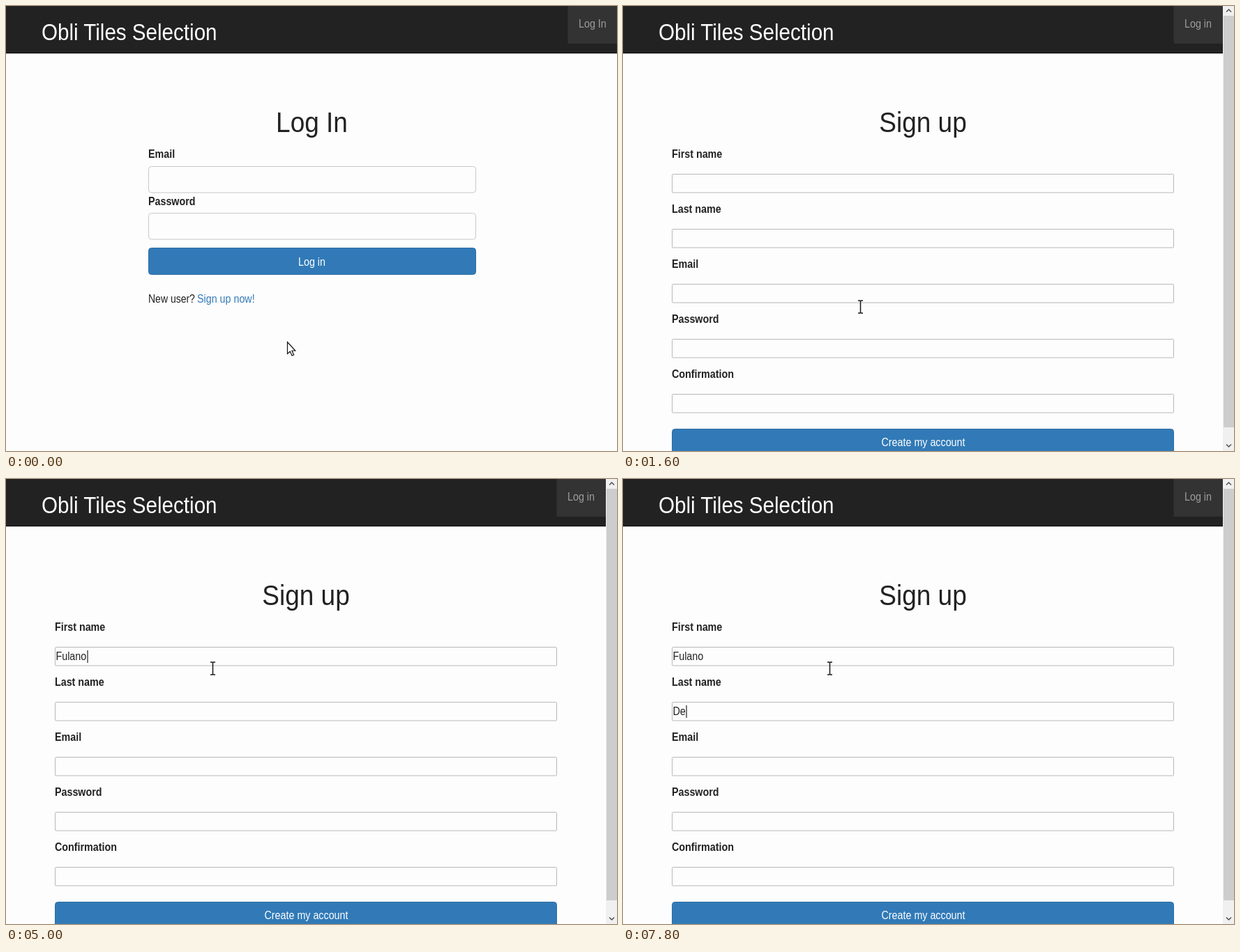
Write an HTML page that moves like this. It is 876x639 px and loops after 8 s.

```html
<!DOCTYPE html>
<html lang="en">
<head>
<meta charset="utf-8">
<title>Sign up demo</title>
<style>
  html, body { margin: 0; width: 100%; height: 100%; overflow: hidden; background: #fdfdfd; }
  svg { display: block; width: 876px; height: 639px; }
  text { font-family: "Liberation Sans", Arial, sans-serif; font-size: 14.3px; fill: #222; white-space: pre; }
  .mid { text-anchor: middle; }
  .logo { font-size: 29.6px; fill: #fff; }
  .title { font-size: 37px; }
  .label { font-weight: bold; }
  .nav { fill: #9d9d9d; }
  .light { fill: #fff; }
  .ask { font-size: 14px; }
  .link { fill: #337ab7; }
  .hover .link { fill: #23527c; }
  .status { font-family: "Open Sans", "Noto Sans", sans-serif; font-size: 11.1px; fill: #fff; }
</style>
</head>
<body>
<svg id="stage" viewBox="0 0 876 639">
  <rect width="876" height="639" fill="#fdfdfd"/>
  <g id="login"></g>
  <g id="signup"></g>
  <path id="caret" stroke="#222" stroke-width="1.2"/>
  <g id="arrow"><path d="M.5 .5V17.5L4.3 14L7 20L9.6 19L7 13H11.8Z" fill="#fff" stroke="#111" stroke-width="1.2"/></g>
  <g id="hand">
    <path d="M4.5 1.5Q6.5 -.3 8 2V8.5Q10 7.2 11 9.2Q13 8.2 13.9 10.2Q16.6 9.8 16.8 12.5V18Q16 21.5 14 23V26H6V23Q3 19 .6 14.5Q.2 12 2.6 12.6L4.5 15Z" fill="#fff" stroke="#222" stroke-width="1.2"/>
    <path d="M8 8.5V13M11 9.5V13M13.9 10.5V14" stroke="#222" fill="none"/>
  </g>
  <g id="beam"><path d="M-3.5 -9H-1L0 -8L1 -9H3.5M0 -8V8M-3.5 9H-1L0 8L1 9H3.5" fill="none" stroke="#181818" stroke-width="1.5"/></g>
</svg>
<script>
const el = id => document.getElementById(id);
const show = (node, on) => node.style.display = on ? "" : "none";

const text = (x, y, str, cls = "", id = "") =>
  `<text id="${id}" class="${cls}" transform="translate(${x} ${y}) scale(1 1.12)">${str}</text>`;
const box = (x, y, w, h, fill, extra = "") =>
  `<rect x="${x}" y="${y}" width="${w}" height="${h}" fill="${fill}" ${extra}/>`;
const field = (x, y, w, h, r, stroke) =>
  box(x + .5, y + .5, w - 1, h - 1, "#fdfdfd", `rx="${r}" stroke="${stroke}"`);
const button = (x, y, w, h) =>
  box(x + .5, y + .5, w - 1, h - 1, "#317ab7", 'rx="4" stroke="#2e6da4"');

const header = (width, id) =>
  box(0, 0, width, 68, "#222") + box(0, 67, width, 1, "#0c0c0c") +
  box(0, 68, width, 1, "#cfcfd2") +
  box(width - 70.5, 0, 70.5, 54, "#333") +
  text(51, 49, "Obli Tiles Selection", "logo") +
  text(width - 55, 31, "Log in", "nav", id);

el("login").innerHTML = header(876, "navText") +
  text(438.5, 181, "Log In", "title mid") +
  text(204, 218, "Email", "label") + field(204, 230, 470, 38.5, 4, "#c8c8c8") +
  text(204, 285.5, "Password", "label") + field(204, 297, 470, 38.5, 4, "#c8c8c8") +
  button(204, 347, 470, 39) +
  text(438.5, 372.5, "Log in", "light mid") +
  text(204, 426, "New user?", "ask") + text(274, 426, "Sign up now!", "link") +
  `<path id="underline" d="M274 428H355" stroke="#23527c"/>` +
  `<g id="pressed">` +
  box(274.5, 412.5, 81, 16.5, "none", 'stroke="#555" stroke-dasharray="1 1"') +
  box(0, 618, 264, 21, "#2b2b2b") +
  text(4, 635.5, "Transferindo dados de localhost...", "status") + `</g>`;

const labels = ["First name", "Last name", "Email", "Password", "Confirmation"];
const rowTop = i => 241 + 79 * i;

el("signup").innerHTML = header(860, "") +
  text(430, 181, "Sign up", "title mid") +
  labels.map((name, i) => text(70, rowTop(i) - 23, name, "label") +
    field(70, rowTop(i), 720, 27.5, 1, "#b8b8b8")).join("") +
  text(71.5, 260, "", "", "first") + text(71.5, 339, "", "", "last") +
  button(70, 607, 720, 40) +
  text(430.5, 632, "Create my account", "light mid") +
  box(860, 0, 16, 639, "#f0f0f0") + box(861, 14, 15, 591, "#cdcdcd") +
  `<path d="M865 8.5L868.5 5L872 8.5M865 629.5L868.5 633L872 629.5" fill="none" stroke="#505050" stroke-width="1.5"/>`;

// Each step changes only what it names: ptr = [shape, x, y], caret = [x, y] or null.
const start = { scene: "login", nav: "Log In", ptr: ["arrow", 403, 482], first: "", last: "",
  hover: false, pressed: false, caret: null };
const inFirst = [73, 246], inLast = [73, 325];
const steps = [
  [200, { nav: "Log in", ptr: ["arrow", 396, 474] }],
  [400, { ptr: ["arrow", 378, 455] }],
  [600, { ptr: ["arrow", 356, 436] }],
  [800, { ptr: ["hand", 335, 419], hover: true }],
  [1000, { ptr: ["hand", 331, 421] }],
  [1400, { pressed: true, caret: [689.5, 186] }],
  [1600, { scene: "signup", caret: null, ptr: ["beam", 340.5, 432] }],
  [1800, { ptr: ["beam", 333, 400] }],
  [2000, { ptr: ["beam", 314, 330] }],
  [2200, { ptr: ["beam", 298, 278] }],
  [2400, { ptr: ["beam", 296.5, 272], caret: inFirst }],
  [2600, { caret: null }],
  [3400, { caret: inFirst }],
  [3600, { first: "F", caret: null }],
  [3800, { first: "Fu" }],
  [4000, { first: "Ful" }],
  [4400, { first: "Fula" }],
  [4600, { first: "Fulan" }],
  [4800, { first: "Fulano" }],
  [5000, { caret: [117, 246] }],
  [5400, { caret: null }],
  [5800, { caret: inLast }],
  [6200, { caret: null }],
  [6400, { caret: inLast }],
  [7000, { caret: null }],
  [7200, { caret: inLast }],
  [7400, { last: "D", caret: [82.5, 325] }],
  [7600, { last: "De", caret: null }],
  [7800, { caret: [91, 325] }]
];
const LOOP = 8000;

function draw(t) {
  const s = Object.assign({}, start, ...steps.filter(([at]) => at <= t).map(([, change]) => change));
  for (const id of ["login", "signup"]) show(el(id), s.scene === id);
  for (const id of ["arrow", "hand", "beam"]) show(el(id), s.ptr[0] === id);
  el(s.ptr[0]).setAttribute("transform", `translate(${s.ptr[1]} ${s.ptr[2]})`);
  el("login").classList.toggle("hover", s.hover);
  show(el("underline"), s.hover);
  show(el("pressed"), s.pressed);
  el("navText").textContent = s.nav;
  el("first").textContent = s.first;
  el("last").textContent = s.last;
  show(el("caret"), s.caret);
  if (s.caret) el("caret").setAttribute("d", `M${s.caret[0]} ${s.caret[1]}v18`);
}

const began = performance.now();
function tick() {
  draw((performance.now() - began) % LOOP);
  requestAnimationFrame(tick);
}
tick();
</script>
</body>
</html>
```
